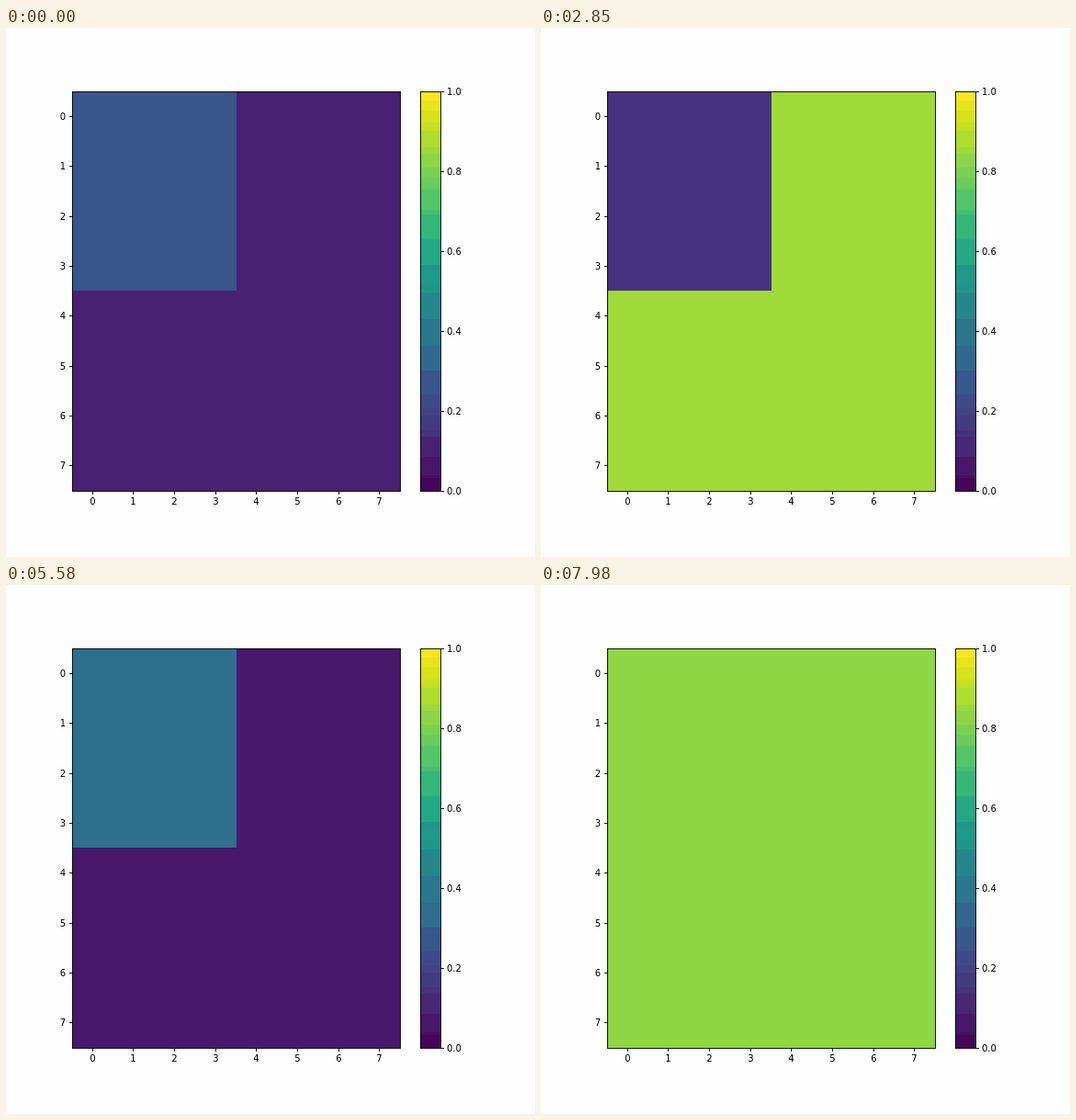
Write an HTML page with a canvas that moves like this. It is 576 by 576 pixels and loops after 8000 ms.

```html
<!DOCTYPE html>
<html lang="en">
<head>
<meta charset="utf-8">
<title>Two oscillating regions</title>
<style>
  html, body { margin: 0; width: 100%; height: 100%; overflow: hidden; background: #fefefe; }
  canvas { display: block; }
</style>
</head>
<body>
<canvas id="stage" width="576" height="576"></canvas>
<script>
const ctx = document.getElementById('stage').getContext('2d');
const LOOP = 8000, STEP = 30;
const LEFT = 72, RIGHT = 429, TOP = 69, BOTTOM = 504, SPLIT_X = 251, SPLIT_Y = 286;
const BAR_LEFT = 451, BAR_RIGHT = 473;
const WIDTH = 357.12, HEIGHT = 434.88;

const VIRIDIS = ('440154 481568 482677 453781 3f4788 39558c 32648e 2d718e 287d8e 238a8d ' +
  '1f968b 20a386 29af7f 3cbc75 56c667 74d055 94d840 b8de29 dce318 fde725').split(' ')
  .map(hex => [0, 2, 4].map(i => parseInt(hex.slice(i, i + 2), 16)));

function viridis(value) {
  const level = Math.max(0, Math.min(255, Math.floor(value * 256)));
  const pos = level / 255 * (VIRIDIS.length - 1);
  const i = Math.min(VIRIDIS.length - 2, Math.floor(pos));
  return VIRIDIS[i].map((c, k) => Math.round(c + (VIRIDIS[i + 1][k] - c) * (pos - i)));
}

// Coarse colour bucket: 3 bits red, 4 bits green, 3 bits blue.
const bucket = ([r, g, b]) => (r >> 5) << 7 | (g >> 4) << 3 | b >> 5;

const wave = degrees => 0.5 + 0.5 * Math.cos(degrees * Math.PI / 180);
const cornerColor = n => viridis(wave(118 + 11.55 * n));
const fieldColor = n => viridis(wave(-144.5 + 5.775 * n));
const sameBuckets = (n, m) => bucket(cornerColor(n)) === bucket(cornerColor(m)) &&
  bucket(fieldColor(n)) === bucket(fieldColor(m));

const barRows = [];
for (let y = TOP; y < BOTTOM; y++) {
  barRows.push({ y, color: viridis((BOTTOM - y - 0.5) / HEIGHT) });
}

// Every bucket is painted in the mean colour of all the pixels that fall in it.
function makePalette(corner, field) {
  const sums = new Map();
  const add = (color, weight) => {
    const key = bucket(color);
    const sum = sums.get(key) || [0, 0, 0, 0];
    color.forEach((c, i) => sum[i] += c * weight);
    sum[3] += weight;
    sums.set(key, sum);
  };
  const cornerArea = (SPLIT_X - LEFT) * (SPLIT_Y - TOP);
  add(corner, cornerArea);
  add(field, (RIGHT - LEFT) * (BOTTOM - TOP) - cornerArea);
  barRows.forEach(row => add(row.color, BAR_RIGHT - BAR_LEFT));
  return color => {
    const [r, g, b, weight] = sums.get(bucket(color));
    return `rgb(${[r, g, b].map(c => Math.round(c / weight))})`;
  };
}

function fill(style, x0, y0, x1, y1) {
  ctx.fillStyle = style;
  ctx.fillRect(x0, y0, x1 - x0, y1 - y0);
}

function line(x0, y0, x1, y1) {
  ctx.beginPath();
  ctx.moveTo(x0, y0);
  ctx.lineTo(x1, y1);
  ctx.stroke();
}

function label(text, x, y, align) {
  ctx.textAlign = align;
  ctx.fillText(text, x, y);
}

function drawAxes() {
  ctx.strokeStyle = ctx.fillStyle = '#000';
  ctx.lineWidth = 0.9;
  ctx.font = '10px "DejaVu Sans", sans-serif';
  ctx.strokeRect(LEFT + 0.5, TOP + 0.5, RIGHT - LEFT, BOTTOM - TOP);
  ctx.strokeRect(BAR_LEFT + 0.5, TOP + 0.5, BAR_RIGHT - BAR_LEFT, BOTTOM - TOP);
  for (let i = 0; i < 8; i++) {
    const x = Math.floor(LEFT + WIDTH * (i + 0.5) / 8) + 0.5;
    const y = Math.floor(69.12 + HEIGHT * (i + 0.5) / 8) + 0.5;
    line(x, BOTTOM + 0.5, x, BOTTOM + 4);
    line(LEFT + 0.5, y, LEFT - 3, y);
    label(i, x, 519, 'center');
    label(i, 65, Math.floor(y) + 4, 'right');
  }
  for (let i = 0; i <= 5; i++) {
    const y = Math.floor(BOTTOM - HEIGHT * i / 5) + 0.5;
    line(BAR_RIGHT + 0.5, y, BAR_RIGHT + 4, y);
    label((i / 5).toFixed(1), 480, Math.floor(y) + 4, 'left');
  }
}

function draw(time) {
  let n = Math.floor(time % LOOP / STEP);
  // The picture holds until one of the regions enters another bucket.
  while (n > 0 && sameBuckets(n, n - 1)) n--;
  const corner = cornerColor(n), field = fieldColor(n);
  const paint = makePalette(corner, field);
  fill('#fefefe', 0, 0, 576, 576);
  fill(paint(field), LEFT, TOP, RIGHT, BOTTOM);
  fill(paint(corner), LEFT, TOP, SPLIT_X, SPLIT_Y);
  for (const { y, color } of barRows) fill(paint(color), BAR_LEFT, y, BAR_RIGHT, y + 1);
  drawAxes();
}

function tick() {
  draw(performance.now());
  requestAnimationFrame(tick);
}
tick();
</script>
</body>
</html>
```
